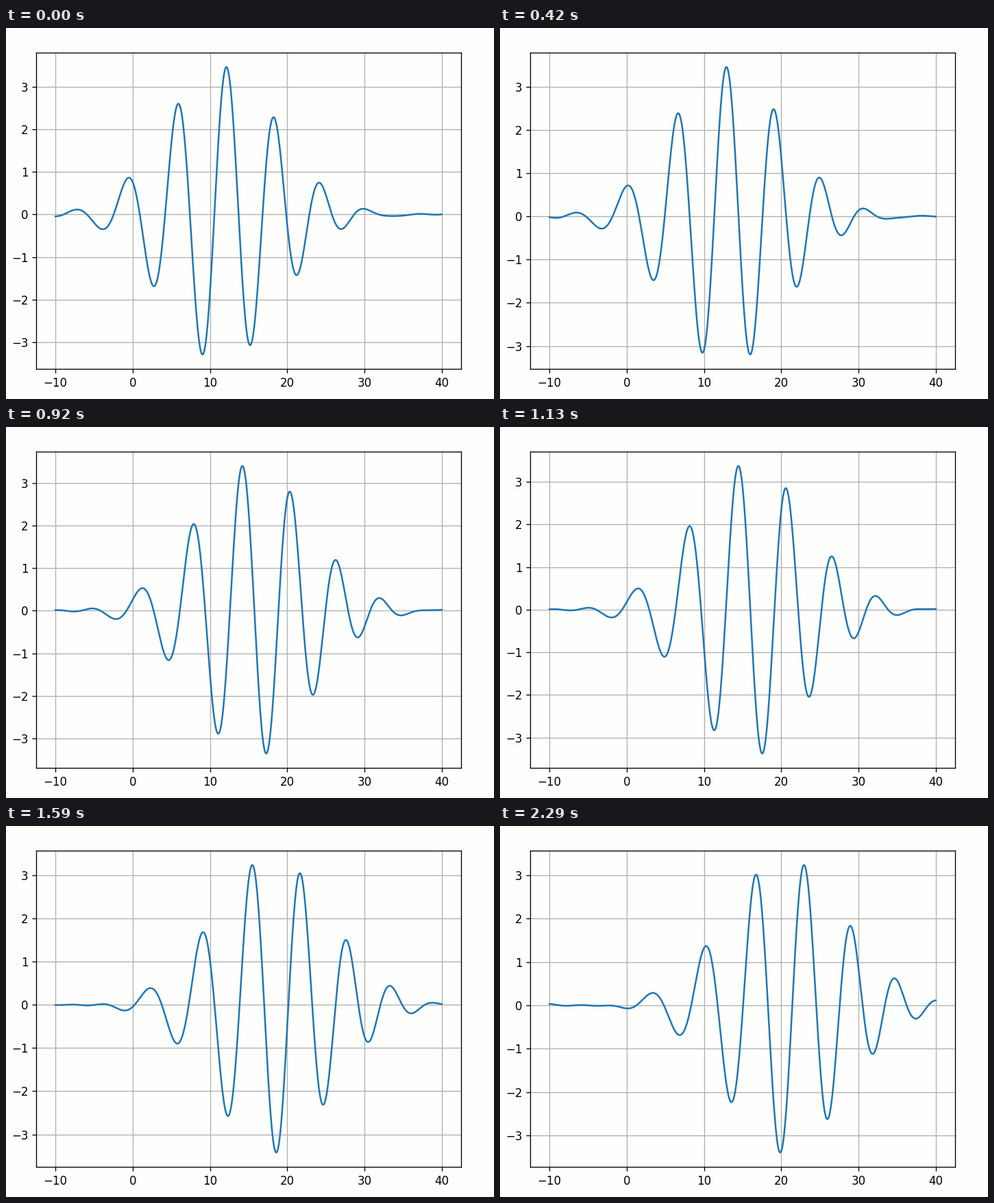
Write a matplotlib script that moves like this. It is 712 px wide and 542 px high and loops after 2330 ms.

```python
import numpy as np
import matplotlib.pyplot as plt
from matplotlib.animation import FuncAnimation
from matplotlib.ticker import MultipleLocator

W, H, DPI = 712, 542, 120
LOOP_MS, TICK_MS = 2330, 10
PAPER = "#fefefc"

x = np.linspace(-10, 40, 1000)
wave_numbers = np.arange(7, 14) / 10


def packet(t):
    """Free wave packet: seven waves around k = 1 with omega = k^2 / 2."""
    return sum(np.exp(-25 * (k - 1) ** 2) * np.cos(k * x - k * k * t / 2)
               for k in wave_numbers)


def time_at(ms):
    # Even steps of half a unit, with one short stall near the end.
    step = np.interp(ms, [0, 90, 1600, 2000, 2345], [0, 1, 14, 16, 19])
    return 11.5 + 0.5 * np.floor(step + 1e-9)


fig = plt.figure(figsize=(W / DPI, H / DPI), dpi=DPI, facecolor=PAPER)
ax = fig.add_axes([44 / W, 44 / H, 620 / W, 462 / H], facecolor=PAPER)
ax.set_xlim(-12.5, 42.5)
ax.xaxis.set_major_locator(MultipleLocator(10))
ax.yaxis.set_major_locator(MultipleLocator(1))
ax.grid(True, color="#b0b0b0", lw=0.8)
curve, = ax.plot(x, packet(time_at(0)), color="#1f77b4", lw=1.5)


def draw(i):
    y = packet(time_at(i * TICK_MS))
    curve.set_ydata(y)
    margin = 0.05 * np.ptp(y)
    ax.set_ylim(y.min() - margin, y.max() + margin)
    return [curve]


anim = FuncAnimation(fig, draw, frames=LOOP_MS // TICK_MS, interval=TICK_MS,
                     repeat=True, repeat_delay=0, blit=False)
plt.show()
```
